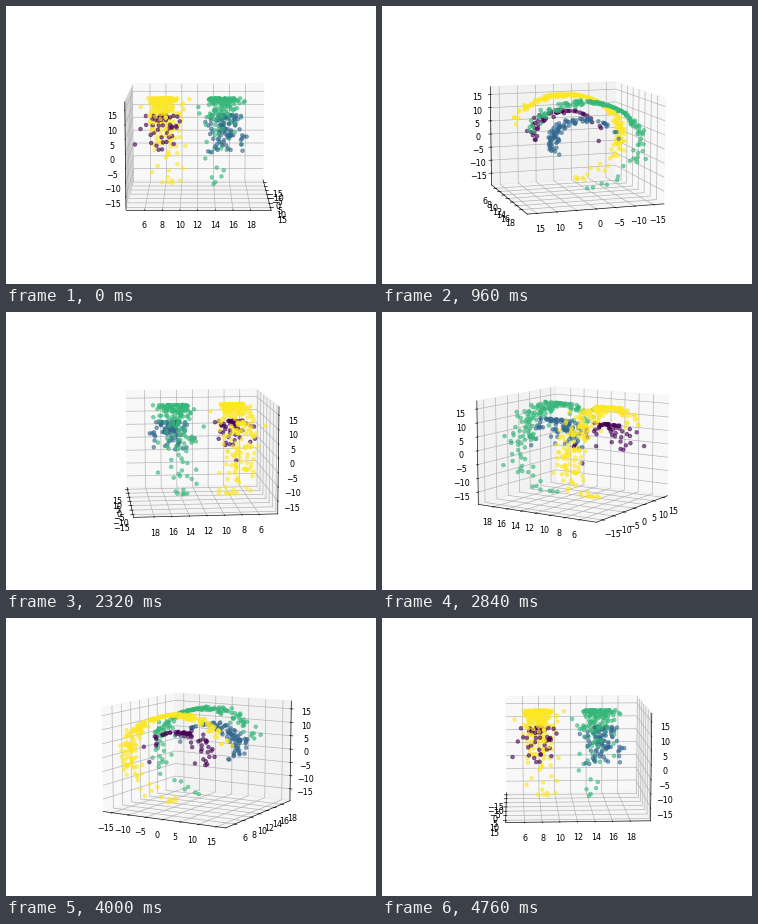
These frames come from a looping animation (370x278 px, 4.8 s). A matplotlib script:

```python
import numpy as np
import matplotlib.pyplot as plt
from matplotlib.animation import FuncAnimation

FRAMES = 120
DPI = 57.8125
rng = np.random.default_rng(7)

# Arcs of the rolled sheet: radius, bend, first angle
INNER = (9.8, 0.06, -0.3)
OUTER = (15.75, 0.045, 0.3)

# arc, count, centre along the roll axis, mean angle
CLUSTERS = [
    (INNER, 58, 7.9, 1.4),
    (INNER, 92, 15.2, 0.7),
    (OUTER, 165, 14.8, 2.0),
    (OUTER, 235, 7.9, 2.25),
]


def roll_points(arc, count, centre, mean):
    """Sample one cluster lying along an arc of the rolled sheet."""
    radius, bend, first = arc
    angle = rng.normal(mean, 1, 4 * count)
    angle = angle[angle > first][:count]
    turn = angle - 2.7
    r = radius + 0.3 * turn + bend * turn ** 3
    y = rng.normal(centre, 0.98, count)
    return np.column_stack([r * np.cos(angle), y, r * np.sin(angle)])


parts = [roll_points(*cluster) for cluster in CLUSTERS]
labels = np.repeat(range(len(parts)), [len(p) for p in parts])

# A hair over whole pixels, so the canvas size never rounds down
fig = plt.figure(figsize=(370.001 / DPI, 278.001 / DPI), dpi=DPI)
ax = fig.add_subplot(projection="3d")
ax.scatter(*np.vstack(parts).T, c=labels, cmap="viridis", s=20, alpha=0.6,
           depthshade=False)

ax.set_xticks(range(-15, 16, 5))
ax.set_yticks(range(6, 19, 2))
ax.set_zticks(range(-15, 16, 5))
ax.set_xlim(-17.8, 17.4)
ax.set_ylim(3.87, 20.32)
ax.set_zlim(-19.5, 17.9)


def update(i):
    ax.view_init(elev=10, azim=i * 360 / FRAMES)
    return []


anim = FuncAnimation(fig, update, frames=FRAMES, interval=40, repeat=True)
plt.show()
```
